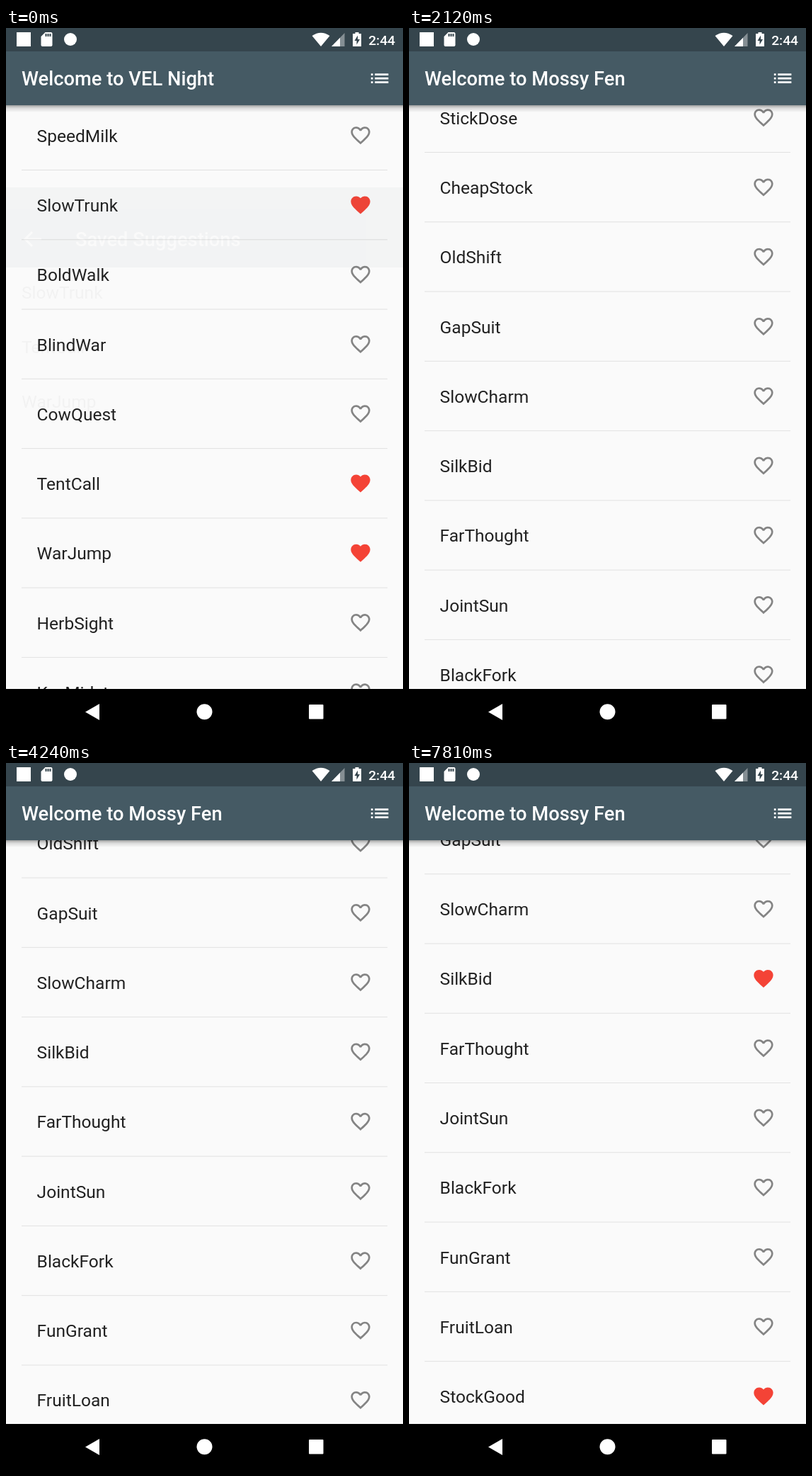
Animation, 561 px wide and 998 px high, one loop 8000 ms. Source, as an HTML page:

```html
<!DOCTYPE html>
<html lang="en">
<head>
<meta charset="utf-8">
<title>Word list</title>
<style>
  html, body { margin: 0; width: 100%; height: 100%; overflow: hidden; background: #000; }
  svg { display: block; width: 100%; height: 100%; font-family: Roboto, sans-serif; }
  .word { font-size: 24.55px; fill: #000; fill-opacity: .87; }
  .title { font-size: 27.3px; font-weight: 500; fill: #fff; }
  .clock { font-size: 19.2px; font-weight: 500; fill: #fff; }
</style>
</head>
<body>
<svg viewBox="0 0 561 998" xmlns="http://www.w3.org/2000/svg">
  <defs>
    <path id="full" d="M12 21.35l-1.45-1.32C5.4 15.36 2 12.28 2 8.5 2 5.42 4.42 3 7.5 3c1.74 0 3.41.81 4.5 2.09C13.09 3.81 14.76 3 16.5 3 19.58 3 22 5.42 22 8.5c0 3.78-3.4 6.86-8.55 11.54L12 21.35z" fill="#f44336"/>
    <path id="line" d="M16.5 3c-1.74 0-3.41.81-4.5 2.09C10.91 3.81 9.24 3 7.5 3 4.42 3 2 5.42 2 8.5c0 3.78 3.4 6.86 8.55 11.54L12 21.35l1.45-1.32C18.6 15.36 22 12.28 22 8.5 22 5.42 19.58 3 16.5 3zm-4.4 15.55l-.1.1-.1-.1C7.14 14.24 4 11.39 4 8.5 4 6.5 5.5 5 7.5 5c1.54 0 3.04.99 3.57 2.36h1.87C13.46 5.99 14.96 5 16.5 5c2 0 3.5 1.5 3.5 3.5 0 2.89-3.14 5.74-7.9 10.05z" fill="#000" fill-opacity=".47"/>
    <path id="menu" d="M3 13h2v-2H3zm0 4h2v-2H3zm0-8h2V7H3zm4 4h14v-2H7zm0 4h14v-2H7zM7 7v2h14V7z" fill="#fff"/>
    <linearGradient id="shade" x2="0" y2="1">
      <stop offset="0" stop-color="#000" stop-opacity=".36"/>
      <stop offset=".4" stop-color="#000" stop-opacity=".13"/>
      <stop offset="1" stop-color="#000" stop-opacity="0"/>
    </linearGradient>
    <clipPath id="tile"><rect x="22" y="-38" width="517" height="76"/></clipPath>
  </defs>

  <g id="pages"></g>

  <g id="leaving" opacity=".035">
    <rect y="225" width="561" height="113" fill="#455a64"/>
    <path d="M50 298H28m9-10l-10 10 10 10" fill="none" stroke="#fff" stroke-width="3"/>
    <text class="title" x="98" y="308">Saved Suggestions</text>
    <g class="word">
      <text x="22" y="382">SlowTrunk</text>
      <text x="22" y="459">TentCall</text>
      <text x="22" y="536">WarJump</text>
    </g>
  </g>

  <rect width="561" height="33" fill="#35454d"/>
  <g fill="#fff">
    <rect x="15" y="6" width="20" height="20"/>
    <path transform="translate(45.5 4)" d="M18 2h-8L4 8v12c0 1.1.9 2 2 2h12c1.1 0 2-.9 2-2V4c0-1.1-.9-2-2-2zm-6 6h-2V4h2zm3 0h-2V4h2zm3 0h-2V4h2z"/>
    <circle cx="91" cy="16" r="9"/>
    <path d="M445 26L432.5 11Q445 2.500 457.500 11z"/>
    <path d="M478.500 7v19H460z" opacity=".4"/>
    <path d="M472 13.700V26H460z"/>
    <path d="M493.500 8v-2h5v2h3.500v18h-12V8z"/>
    <path d="M497 10.500l-4.500 7.500h3v5.500l4.500-7.500h-3z" fill="#35454d"/>
    <text class="clock" x="550" y="23.500" text-anchor="end">2:44</text>
  </g>

  <rect y="933" width="561" height="65" fill="#000"/>
  <g fill="#fff">
    <path d="M112 965.500L132 954v23z"/>
    <circle cx="280.500" cy="965.200" r="11"/>
    <rect x="428" y="955" width="20.500" height="20.500" rx="1"/>
  </g>
</svg>
<script>
const LOOP = 8000, PITCH = 98.27, FIRST = 169;
const NS = 'http://www.w3.org/2000/svg';
const $ = id => document.getElementById(id);

function add(parent, tag, attrs = {}, text = '') {
  const el = document.createElementNS(NS, tag);
  for (const k in attrs) el.setAttribute(k, attrs[k]);
  el.textContent = text;
  parent.appendChild(el);
  return el;
}

function makeRow(list, word, i) {
  const g = add(list, 'g', { transform: `translate(0 ${FIRST + i * PITCH})` });
  const clip = add(g, 'g', { 'clip-path': 'url(#tile)' });
  const splash = add(clip, 'circle', { cx: 501, cy: 0, r: 0, fill: '#c8c8c8', opacity: 0 });
  add(g, 'rect', { x: 22, y: 48, width: 517, height: 1, fill: '#000', 'fill-opacity': .1 });
  add(g, 'text', { class: 'word', x: 43.6, y: 8.7 }, word);
  const heart = add(g, 'use', { href: '#line', transform: 'translate(484.6 -16.9) scale(1.365)' });
  return { splash, heart };
}

function makePage(title, words) {
  const page = add($('pages'), 'g');
  add(page, 'rect', { width: 561, height: 998, fill: '#fafafa' });
  const list = add(page, 'g');
  const rows = words.split(' ').map((w, i) => makeRow(list, w, i));
  add(page, 'rect', { y: 109, width: 561, height: 10, fill: 'url(#shade)' });
  add(page, 'rect', { width: 561, height: 109, fill: '#455a64' });
  add(page, 'text', { class: 'title', x: 22, y: 81 }, 'Welcome to ' + title);
  add(page, 'use', { href: '#menu', transform: 'translate(511.700 54.700) scale(1.365)' });
  return { page, list, rows };
}

const next = makePage('Mossy Fen',
  'RainDesk ColdBell MoonPath TallCup WildStep SandKey LightGlobe GainSword AimLie ' +
  'DrunkScene StickDose CheapStock OldShift GapSuit SlowCharm SilkBid FarThought ' +
  'JointSun BlackFork FunGrant FruitLoan StockGood');
const prev = makePage('VEL Night',
  'SpeedMilk SlowTrunk BoldWalk BlindWar CowQuest TentCall WarJump HerbSight KeyMidst');

const setHeart = (row, on) => row.heart.setAttribute('href', on ? '#full' : '#line');
const scrollTo = (view, y) => view.list.setAttribute('transform', `translate(0 ${-y})`);
const ramp = (t, a, b) => Math.min(1, Math.max(0, (t - a) / (b - a)));

scrollTo(prev, 17);
[1, 5, 6].forEach(i => setHeart(prev.rows[i], true));

// Drag keys: time, offset, speed in px/ms
const drag = [[3290, 1024.7, 0], [3700, 1144.2, .2], [4240, 1234.5, .18], [4780, 1338.3, 0]];

function offset(t) {
  if (t < drag[0][0]) {
    return drag[0][1] * (1 - Math.cos(Math.PI * ramp(t, 1269, 2120))) / 2;
  }
  for (let i = 1; i < drag.length; i++) {
    const [t0, y0, v0] = drag[i - 1], [t1, y1, v1] = drag[i];
    if (t > t1) continue;
    const d = t1 - t0, u = (t - t0) / d, w = 1 - u;
    return w * w * (1 + 2 * u) * y0 + u * u * (3 - 2 * u) * y1 + d * u * w * (w * v0 - u * v1);
  }
  return drag[drag.length - 1][1];
}

function tap(row, t, start) {
  const u = ramp(t, start - 40, start + 210);
  setHeart(row, t >= start);
  row.splash.setAttribute('r', 20 + 240 * u);
  row.splash.setAttribute('opacity', u > 0 ? .4 * (1 - u) : 0);
}

function draw(t) {
  $('leaving').style.display = t < 50 ? '' : 'none';
  prev.page.setAttribute('opacity', 1 - ramp(t, 50, 1250));
  scrollTo(next, offset(t));
  tap(next.rows[15], t, 5440);
  tap(next.rows[21], t, 7560);
}

const begin = performance.now();
function tick() {
  draw((performance.now() - begin) % LOOP);
  requestAnimationFrame(tick);
}
tick();
</script>
</body>
</html>
```
